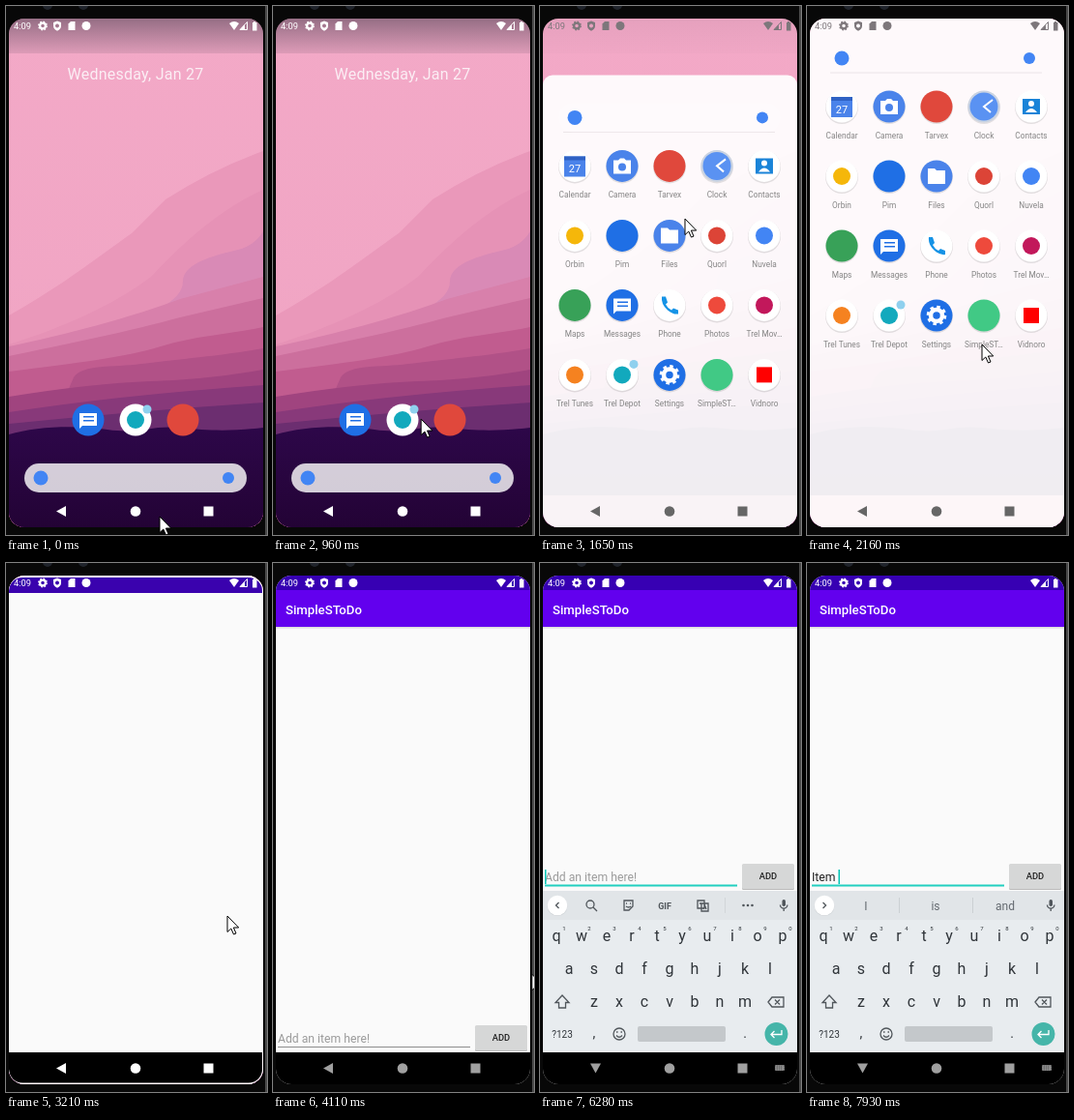
Animation of 270 by 547 pixels, one loop 8000 ms. Source, as an HTML page:

```html
<!DOCTYPE html>
<html lang="en">
<head>
<meta charset="utf-8">
<style>
  html, body { margin: 0; width: 270px; height: 547px; overflow: hidden; background: #080808; }
  svg { display: block; font-family: Roboto, sans-serif; }
  text { white-space: pre; }
  .mid { text-anchor: middle; }
  .line { fill: none; stroke: currentColor; stroke-width: 1.3; }
</style>
</head>
<body>
<svg id="stage" width="270" height="547" viewBox="0 0 270 547">
  <defs>
    <clipPath id="screen"><rect x="3" y="13" width="263" height="526" rx="16"/></clipPath>
    <clipPath id="launchClip"><rect id="launchRect" rx="5"/></clipPath>
    <clipPath id="aboveNav"><rect x="3" y="66" width="263" height="440"/></clipPath>
    <linearGradient id="sky" x2="0" y2="1"><stop stop-color="#f3a9c7"/><stop offset="1" stop-color="#efa3c2"/></linearGradient>
    <linearGradient id="hill" x2="0" y2="1"><stop stop-color="#2d0749"/><stop offset="1" stop-color="#230335"/></linearGradient>
    <linearGradient id="shade" x2="0" y2="1"><stop stop-color="#403848" stop-opacity=".52"/><stop offset="1" stop-color="#403848" stop-opacity=".12"/></linearGradient>
  </defs>
  <rect width="270" height="547" fill="#080808"/>
  <rect x="268" width="2" height="547" fill="#484848"/>
  <g fill="#20242c"><circle cx="43" cy="-1" r="5"/><circle cx="80" cy="-1" r="5"/></g>

  <g clip-path="url(#screen)">
    <g id="home">
      <g id="wallpaper"><rect x="3" y="13" width="263" height="526" fill="url(#sky)"/></g>
      <rect id="scrim" x="3" y="13" width="263" height="36" fill="url(#shade)"/>
      <text id="date" class="mid" x="134" y="76" font-size="16" letter-spacing=".25" fill="#fbeef4">Wednesday, Jan 27</text>
      <g id="dock"></g>
      <rect id="panel" x="3" width="263" height="560" rx="10" fill="#fff"/>
      <rect id="navShade" x="3" y="506" width="263" height="33" fill="#fdf6f8"/>
      <g id="drawer">
        <g id="apps"><path d="M24 69H243" stroke="#ebe4e8"/></g>
        <rect id="pill" x="19" y="39" width="230" height="30" rx="15" fill="#fff"/>
        <circle cx="36" cy="54" r="7.5" fill="#4285f4"/>
        <circle cx="230" cy="54" r="6" fill="#4285f4"/>
      </g>
    </g>

    <g id="launch" clip-path="url(#launchClip)">
      <rect y="13" width="270" height="526" fill="#fafafa"/>
      <rect y="13" width="270" height="18" fill="#3a02ae"/>
      <rect y="506" width="270" height="33"/>
    </g>

    <g id="todo">
      <rect y="13" width="270" height="526" fill="#fafafa"/>
      <rect y="66" width="270" height="1.5" fill="#ddd"/>
      <rect y="28" width="270" height="38" fill="#6200ee"/>
      <rect y="13" width="270" height="15" fill="#3700b3"/>
      <text x="13" y="53" font-size="13.2" font-weight="500" fill="#fff">SimpleSToDo</text>
      <g id="field">
        <text id="hint" x="5" y="496" font-size="12.2" fill="#9b9b9b">Add an item here!</text>
        <text id="typed" x="5" y="496" font-size="12.2" fill="#222"></text>
        <rect id="underline" x="5" width="199"/>
        <rect id="caret" y="484" width="1.5" height="15" fill="#03c5b5"/>
        <rect x="209" y="479" width="54" height="26" rx="1.5" fill="#bbb"/>
        <rect x="209" y="478" width="54" height="26" rx="1.5" fill="#d6d7d7"/>
        <text class="mid" x="236" y="494" font-size="9.4" font-weight="500" fill="#222">ADD</text>
      </g>
      <g clip-path="url(#aboveNav)"><g id="keyboard" color="#50565b">
        <rect y="339" width="270" height="168" fill="#e8ecef"/>
        <rect y="339" width="270" height="30" fill="#e1e5e8"/>
        <circle cx="18" cy="354.5" r="10.5" fill="#cfd3d6"/><circle cx="18" cy="354" r="10.3" fill="#fff"/>
        <path id="chevron" class="line"/>
        <g id="tools">
          <path class="line" d="M55 356L59 360M56 353a4 4 0 1 0-8 0a4 4 0 0 0 8 0"/>
          <path class="line" d="M87 349H96V355L92 359H87ZM89 352H90M93 352H94M89 355Q91.5 357 94 355"/>
          <text class="mid" x="129" y="357.5" font-size="9" font-weight="700" fill="#50565b">GIF</text>
          <path class="line" d="M163 349H170V357H163ZM167 352H174V360H167ZM169 358L170.5 354L172 358M165 352H168"/>
          <g fill="#50565b"><circle cx="210.5" cy="354" r="1.3"/><circle cx="215" cy="354" r="1.3"/><circle cx="219.5" cy="354" r="1.3"/></g>
          <path d="M191.5 346V362" stroke="#d2d6d9"/>
        </g>
        <g id="words" class="mid" font-size="12" fill="#646a70">
          <path d="M95.5 346V362M171.5 346V362" stroke="#cbd0d3"/>
          <text x="61" y="358.5"></text><text x="133" y="358.5"></text><text x="205" y="358.5"></text>
        </g>
        <rect x="250.5" y="348" width="3.5" height="7" rx="1.7" fill="#50565b"/>
        <path class="line" d="M248.5 353.5a3.7 3.7 0 0 0 7.4 0M252.2 357V360"/>
        <g id="keys" class="mid" fill="#30353a"></g>
        <path class="line" d="M23 447L30 454.5H26.5V460H19.5V454.5H16Z"/>
        <path class="line" d="M236 454L240 449H252V459H240ZM243 451.5L248 456.5M248 451.5L243 456.5"/>
        <circle class="line" cx="82" cy="487" r="6"/>
        <path class="line" d="M79 485H80.5M83.5 485H85M79 488.5Q82 492 85 488.5"/>
        <rect x="101" y="479" width="91" height="16" rx="2" fill="#c4c8cb"/>
        <circle cx="244.5" cy="487" r="12" fill="#45b5a9"/>
        <path class="line" color="#fff" d="M250 483V487.5H239M242.5 484L239 487.5L242.5 491"/>
      </g></g>
      <rect y="506" width="270" height="33"/>
    </g>

    <g id="status" fill="currentColor">
      <text x="8" y="24" font-size="9.3">4:09</text>
      <g id="statusGear"></g>
      <path fill-rule="evenodd" d="M53 15.5L57 17V20.5Q57 24 53 25.8Q49 24 49 20.5V17ZM53 18.5a2 2 0 1 0 .01 0Z"/>
      <path d="M67 16H71.5V25H64.5V18.5Z"/>
      <circle cx="83" cy="20.5" r="4.5"/>
      <path d="M231 18Q236 14 241 18L236 25Z"/>
      <path d="M249.5 16.5V24.5H242Z" fill="none" stroke="currentColor"/><path d="M247 19.5V24.5H242Z"/>
      <path d="M255 17H256V16H258V17H259.5V25.5H255Z"/>
    </g>
    <g id="nav" fill="currentColor">
      <path id="back"/>
      <circle cx="134" cy="522.5" r="5.3"/>
      <rect x="204.5" y="517.5" width="10" height="10"/>
      <path id="imeSwitch" d="M243 519H253V525H243ZM244.5 521H251.5M244.5 523H251.5" stroke="#111" stroke-dasharray="1.5 .6" stroke-width=".7"/>
    </g>
  </g>
  <path id="cursor" d="M0 0V16.5L3.8 13L6.5 19L9 18L6.4 12H11.7Z" fill="#fff" stroke="#000"/>
</svg>

<script>
const $ = id => document.getElementById(id);
const add = (id, markup) => $(id).insertAdjacentHTML('beforeend', markup);
const set = (id, attrs) => { for (const k in attrs) $(id).setAttribute(k, attrs[k]); };
const show = (id, on) => set(id, { display: on ? 'inline' : 'none' });
const moveTo = (id, x, y) => set(id, { transform: `translate(${x} ${y})` });
const disc = (r, fill, x = 0, y = 0) => `<circle cx="${x}" cy="${y}" r="${r}" fill="${fill}"/>`;
const path = (d, fill) => `<path d="${d}" fill="${fill}"/>`;
const at = (x, y, markup) => `<g transform="translate(${x} ${y})">${markup}</g>`;
const gear = (r, color) => `<g fill="none" stroke="${color}"><circle r="${r * .6}" stroke-width="${r * .45}"/>
  <circle r="${r * .88}" stroke-width="${r * .3}" stroke-dasharray="${r * .3455}"/></g>`;

// Wallpaper ridges, back to front
[
  ['M3 320C60 288 100 256 130 235L165 200Q215 168 266 150', '#ea98ba'],
  ['M3 350C60 332 110 310 150 280Q210 215 266 190', '#e692b6'],
  ['M100 337C150 320 183 305 183 285C183 266 215 258 240 252Q258 247 266 233', '#d98ab6'],
  ['M3 352C60 340 130 322 180 303L266 280', '#d880ab'],
  ['M3 362C60 350 130 336 180 322L266 302', '#cc6f9d'],
  ['M3 378C80 368 120 364 160 352S230 340 266 332', '#c15c8f'],
  ['M70 384C80 370 110 374 140 370S220 362 266 354', '#b15187'],
  ['M3 404Q90 390 150 388T266 376', '#a0447f'],
  ['M3 420Q120 402 266 392', '#88397a'],
  ['M3 432Q140 418 266 410', '#6c2e70'],
  ['M3 443C30 435 70 433 105 438S150 433 180 436S230 440 266 436', 'url(#hill)']
].forEach(([d, fill]) => add('wallpaper', path(d + 'V540H3Z', fill)));

const blue = '#1f6fe5';
const mark = color => disc(16.5, '#fff') + disc(9, color);
const glyph = (base, d, fill = '#fff') => disc(16.5, base) + path(d, fill);
const icons = {
  Calendar: glyph('#fff', 'M-11 -10H11V11H-11Z', '#4a83ea') + path('M-11 -10H11V-6H-11Z', '#2f62c4') +
    '<text class="mid" y="7" font-size="11" fill="#fff">27</text>',
  Camera: glyph('#4a83ea', 'M-9 -6H-4L-2 -8H2L4 -6H9V8H-9Z') + disc(4, '#4a83ea', 0, 1),
  Tarvex: disc(16.5, '#e0483c'),
  Clock: disc(16.5, '#c9d3e2') + disc(14.5, '#5a92f2') +
    '<path d="M9 -7L0 0L7 6" fill="none" stroke="#fff" stroke-width="2"/>',
  Contacts: glyph('#fff', 'M-9 -8H9V8H-9Z', '#1a84d8') + disc(3, '#fff', 0, -3) + path('M-6 6Q0 -2 6 6Z', '#fff'),
  Orbin: mark('#f5b70a'),
  Pim: disc(16.5, blue),
  Files: glyph('#4a83ea', 'M-9 -8H-2L0 -6H9V8H-9Z'),
  Quorl: mark('#dc4437'),
  Nuvela: mark('#4285f4'),
  Maps: disc(16.5, '#38a158'),
  Messages: glyph(blue, 'M-9 -7H9V6H-6L-9 9Z') + path('M-5 -4H6V-2.5H-5ZM-5 0H6V1.5H-5Z', blue),
  Phone: glyph('#fff', 'M-8 -9H-4L-2 -3L-4 -1Q-2 3 2 5L4 3L9 5V9Q4 10 -2 5Q-9 -1 -8 -9Z', '#1593e6'),
  Photos: mark('#ee4a3c'),
  'Trel Mov…': mark('#c2185b'),
  'Trel Tunes': mark('#f58220'),
  'Trel Depot': mark('#12a9bd') + disc(4.5, '#8fd0ee', 12, -11),
  Settings: disc(16.5, blue) + gear(10, '#fff'),
  'SimpleST…': disc(16.5, '#41c985'),
  Vidnoro: disc(16.5, '#fff') + path('M-8 -8H8V8H-8Z', '#f00')
};
Object.entries(icons).forEach(([name, icon], i) => add('apps', at(36 + i % 5 * 49, 104 + (i / 5 | 0) * 72,
  disc(17, '#0000001c', 0, 1) + icon + `<text class="mid label" y="32.5" font-size="8.3" fill="#858585">${name}</text>`)));
['Messages', 'Trel Depot', 'Tarvex'].forEach((name, i) => add('dock', at(85 + 49 * i, 428, icons[name])));
add('statusGear', at(38, 20.5, gear(4.8, 'currentColor')));
const labels = document.querySelectorAll('.label');

const key = (char, x, y, size = 16) => add('keys', `<text x="${x}" y="${y}" font-size="${size}">${char}</text>`);
[...'qwertyuiop'].forEach((c, i) => {
  key(c, 17 + 26 * i, 391);
  key((i + 1) % 10, 25 + 26 * i, 380, 6);
});
[...'asdfghjkl'].forEach((c, i) => key(c, 30 + 26 * i, 425));
[...'zxcvbnm'].forEach((c, i) => key(c, 56 + 26 * i, 459));
key('?123', 23, 491, 10);
key(',', 56, 491, 14);
key('.', 212, 491, 14);

const bursts = [[130, 1090, 8], [1230, 2160, 8], [2310, 3210, 8], [3360, 4260, 7], [4410, 5340, 8],
  [5770, 6010, 3], [6280, 6280, 1], [6680, 7250, 5], [7780, 7930, 2]];
const ticks = bursts.flatMap(([a, b, n]) => Array.from({ length: n }, (_, i) => a + (b - a) * i / (n - 1 || 1)));
const snap = t => ticks.reduce((last, tick) => tick <= t + 8 ? tick : last, 0);

// Linear keyframes: [time, value, ...]
function tween(keys, t, i = 1) {
  const n = keys.findIndex(k => k[0] > t);
  if (n < 0) return keys[keys.length - 1][i];
  if (n === 0) return keys[0][i];
  const [a, b] = [keys[n - 1], keys[n]];
  return a[i] + (b[i] - a[i]) * (t - a[0]) / (b[0] - a[0]);
}

const pointer = [[0, 159, 528], [400, 182, 492], [1090, 146, 411], [1230, 145, 356], [1363, 143, 306],
  [1496, 147, 240], [1629, 150, 220], [2160, 181, 350], [2500, 181, 350], [3210, 229, 365],
  [3900, 272, 410], [4410, 262, 447], [5074, 131, 484], [5340, 131, 485]];
const swipe = [[1230, 0], [1363, .1], [1496, .42], [1629, .86], [1762, 1]];
const opening = [[2438, 0], [2567, .45], [2696, .85], [2825, 1]];
const keyboardDrop = [[5770, 110], [5890, 30], [6010, 0]];
const strokes = [6680, 6822, 6964, 7107, 7780];

function draw(now) {
  const t = snap(now % 8000);
  const inApp = t >= 3360, typing = t >= 5770;
  show('home', !inApp);
  show('todo', inApp);
  inApp ? drawTodo(t, typing) : drawHome(t);

  const light = inApp || t < 1600 || t > 2690;
  set('status', { color: light ? '#fff' : '#7d777b' });
  set('nav', { color: inApp ? '#a0a0a0' : light ? '#fff' : '#666' });
  set('back', { d: typing ? 'M52 517.5H63L57.5 527.5Z' : 'M52 522.5L62 517V528Z' });
  show('imeSwitch', typing);
  show('cursor', !typing);
  moveTo('cursor', tween(pointer, t), tween(pointer, t, 2));
  requestAnimationFrame(draw);
}

function drawHome(t) {
  const p = tween(swipe, t), offset = 434 * (1 - p);
  set('scrim', { opacity: 1 - p });
  set('date', { opacity: Math.max(0, 1 - 3.5 * p) });
  moveTo('date', 0, -90 * p);
  set('dock', { opacity: Math.max(0, 1 - 4 * p) });
  moveTo('dock', 0, -100 * p);
  set('panel', { y: 17 + offset - 8 * p, opacity: Math.min(.93, 3 * p) });
  set('navShade', { opacity: Math.max(0, 2 * p - 1) });
  moveTo('drawer', 0, offset);
  set('apps', { opacity: Math.min(1, 1.5 * p) });
  labels.forEach(label => label.setAttribute('opacity', Math.min(1, 4 * Math.max(0, p - .1))));
  set('pill', { opacity: Math.min(.8, 1.2 * (1 - p)) });

  const q = tween(opening, t), mix = (a, b) => a + (b - a) * q;
  show('launch', t > 2430);
  set('launchRect', { x: mix(166, 3), y: mix(303, 15), width: mix(33, 262), height: mix(33, 522.5), rx: mix(16, 14) });
}

function drawTodo(t, typing) {
  show('launch', false);
  const focused = t >= 5300, count = strokes.filter(s => s <= t).length;
  moveTo('field', 0, typing ? -167 : 0);
  set('underline', focused ? { y: 499.5, height: 2, fill: '#22cfc0' } : { y: 500, height: 1, fill: '#8d8d8d' });
  show('hint', !count);
  $('typed').textContent = 'Item '.slice(0, count);
  show('caret', focused && (t < 6010 || t >= 6280));
  set('caret', { x: 5 + (count ? $('typed').getComputedTextLength() : 0) });

  show('keyboard', typing);
  moveTo('keyboard', 0, tween(keyboardDrop, t));
  set('chevron', { d: count ? 'M16.5 351L19.5 354L16.5 357' : 'M19.5 351L16.5 354L19.5 357' });
  show('tools', !count);
  show('words', count);
  const words = t >= 7900 ? ['I', 'is', 'and'] : t >= 7250 ? ['Items', 'Item', 'item'] : ['It', 'I', 'In'];
  $('words').querySelectorAll('text').forEach((el, i) => { el.textContent = words[i]; });
}

requestAnimationFrame(draw);
</script>
</body>
</html>
```
